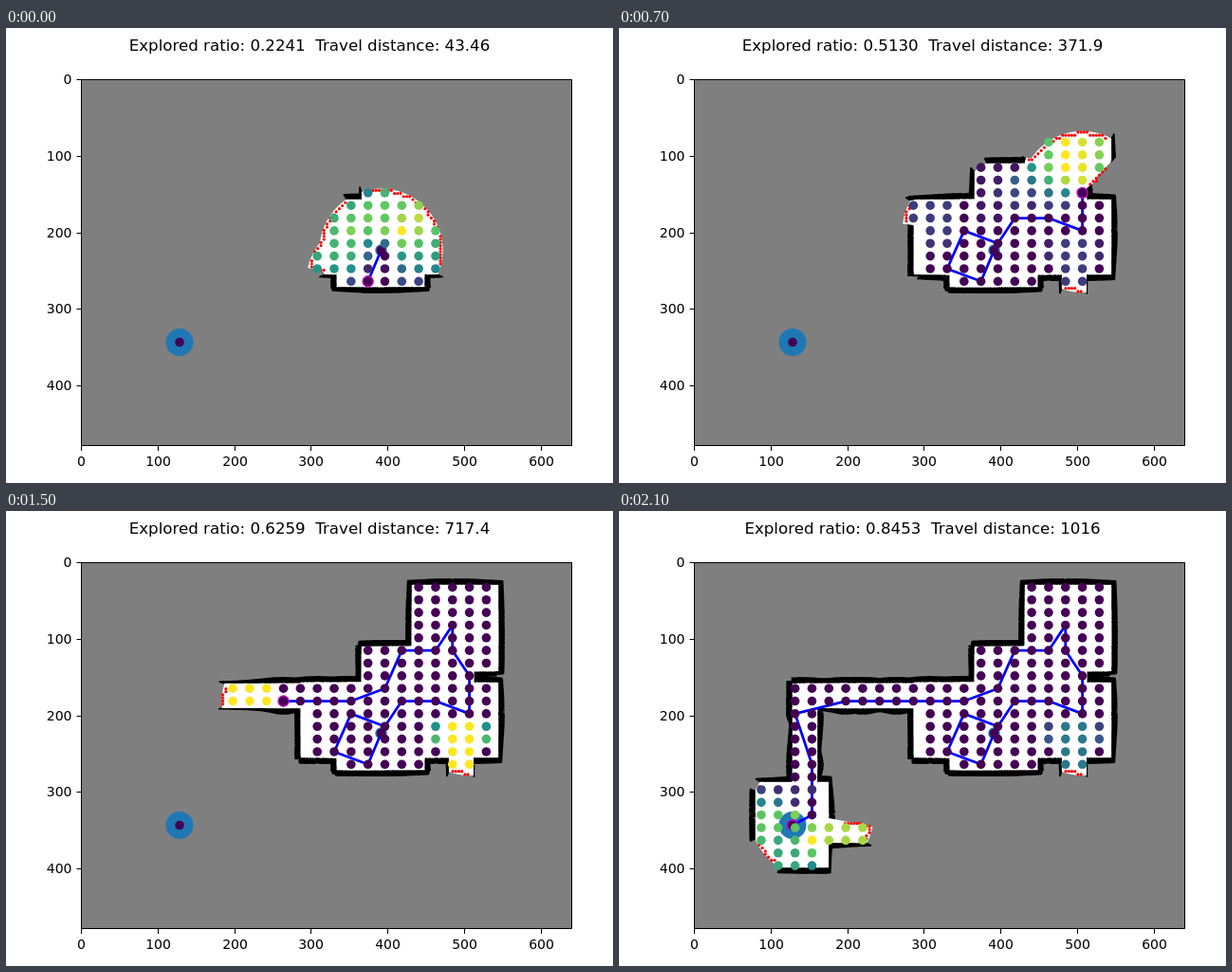
These frames come from a looping animation (640x480 px, 2200 ms). An HTML page with a canvas:

```html
<!DOCTYPE html>
<html>
<head>
<meta charset="utf-8">
<style>
html, body { margin: 0; width: 100%; height: 100%; overflow: hidden; background: #fff; }
canvas { display: block; }
</style>
</head>
<body>
<canvas id="stage" width="640" height="480"></canvas>
<script>
const ctx = document.getElementById('stage').getContext('2d');
const STEP_MS = 100, UNIT = 0.8078, RANGE = 80 * UNIT, GAIN_RANGE = 56;
const WALL_DEPTH = 6.5, RAYS = 1200, CELL = 4 * UNIT;

// Floor plan as overlapping rectangles: left, top, right, bottom
const rooms = [
  [428, 78, 519, 169], [375, 143, 493, 182], [311, 181, 519, 260],
  [349, 259, 441, 273], [467, 259, 493, 330],
  [183, 182, 311, 208], [183, 208, 209, 286],
  [144, 286, 221, 376], [221, 324, 300, 350]
];
const node = (i, j) => ({ x: 150 + 17.82 * i, y: 80.4 + 13.35 * j });
const start = { x: 395.5, y: 234.5 }, goal = { x: 183, y: 331.5 };

// Stops of the robot on the node grid
const stops = [
  [13, 14], [11, 13], [12, 10], [14, 11], [15, 9], [17, 9], [19, 10],
  [19, 7], [18, 5], [18, 3], [17, 5], [15, 5], [14, 8], [12, 9],
  [10, 9], [8, 9], [6, 9], [5, 9], [2, 10], [3, 14], [3, 18]
];
const path = [start, ...stops.map(s => node(...s)), goal];
const distance = (a, b) => Math.hypot(a.x - b.x, a.y - b.y);
const lerp = (a, b, t) => a + (b - a) * t;

// Readings at a few steps; in between they grow with the way travelled
const readings = [
  { step: 0, ratio: 0.2241, travel: 43.46 }, { step: 3, ratio: 0.2861, travel: 192.1 },
  { step: 6, ratio: 0.4625, travel: 322.6 }, { step: 9, ratio: 0.5871, travel: 444.2 },
  { step: 13, ratio: 0.5892, travel: 628.8 }, { step: 17, ratio: 0.6535, travel: 783.8 },
  { step: 21, ratio: 0.8453, travel: 1016 }
];

function wayLength(from, to) {
  let sum = 0;
  for (let k = from + 1; k <= to; k++) sum += distance(path[k], path[k + 1]);
  return sum;
}

function title(step) {
  const k = Math.max(1, readings.findIndex(r => r.step >= step));
  const a = readings[k - 1], b = readings[k];
  const t = wayLength(a.step, step) / wayLength(a.step, b.step);
  const ratio = lerp(a.ratio, b.ratio, t).toFixed(4);
  return `Explored ratio: ${ratio}  Travel distance: ${lerp(a.travel, b.travel, t).toPrecision(4)}`;
}

const viridis = ['440154', '3b528b', '21918c', '5ec962', 'fde725']
  .map(h => [0, 2, 4].map(k => parseInt(h.slice(k, k + 2), 16)));

function heat(v) {
  const p = v * 4, k = Math.min(3, Math.floor(p));
  return `rgb(${viridis[k].map((c, n) => Math.round(lerp(c, viridis[k + 1][n], p - k)))})`;
}

const isFloor = (x, y) => rooms.some(([l, t, r, b]) => x >= l && x <= r && y >= t && y <= b);
const isOpen = ({ x, y }) => [-3, 3].every(d => isFloor(x + d, y) && isFloor(x, y + d));

function sees(a, b, range) {
  const d = distance(a, b);
  if (d > range) return false;
  const n = Math.ceil(d / 1.5);
  for (let k = 1; k < n; k++) {
    if (!isFloor(lerp(a.x, b.x, k / n), lerp(a.y, b.y, k / n))) return false;
  }
  return true;
}

// One sweep of the range sensor; each ray that hits a wall also marks some depth behind it
function scan(from) {
  const area = new Path2D(), walls = new Path2D();
  for (let k = 0; k < RAYS; k++) {
    const a = k / RAYS * 2 * Math.PI, c = Math.cos(a), s = Math.sin(a);
    let r = 0;
    while (r < RANGE && isFloor(from.x + c * r, from.y + s * r)) r += 0.5;
    area.lineTo(from.x + c * r, from.y + s * r);
    if (r >= RANGE) continue;
    walls.moveTo(from.x + c * (r - 1), from.y + s * (r - 1));
    walls.lineTo(from.x + c * (r + WALL_DEPTH), from.y + s * (r + WALL_DEPTH));
  }
  area.closePath();
  return { area, walls };
}

const cells = new Map(), nodes = [];
for (let i = 0; i < 140; i++) {
  for (let j = 0; j < 110; j++) {
    const p = { i, j, x: 80 + i * CELL, y: 55 + j * CELL, seen: false };
    if (isFloor(p.x, p.y)) cells.set(i * 200 + j, p);
  }
}
for (let i = 0; i <= 20; i++) {
  for (let j = 0; j <= 22; j++) {
    const p = node(i, j);
    if (isFloor(p.x, p.y)) nodes.push({ ...p, seen: false });
  }
}

const scans = [];
function explore(from) {
  scans.push(scan(from));
  for (const p of [...cells.values(), ...nodes]) p.seen = p.seen || sees(from, p, RANGE - 0.3);
}

// The frontier is open floor next to unseen floor; a node's gain is how much of it is in view
function survey(step) {
  if (step < stops.length) explore(path[step + 1]);
  const hidden = (i, j) => { const c = cells.get(i * 200 + j); return c && !c.seen; };
  const frontier = [...cells.values()].filter(c => c.seen && isOpen(c) &&
    (hidden(c.i - 1, c.j) || hidden(c.i + 1, c.j) || hidden(c.i, c.j - 1) || hidden(c.i, c.j + 1)));
  const visited = path.slice(0, step + 2);
  const dots = nodes.filter(n => n.seen).map(n => ({
    x: n.x, y: n.y,
    gain: visited.some(v => distance(v, n) < 1) ? 0
      : frontier.filter(f => sees(n, f, GAIN_RANGE)).length
  }));
  const most = Math.max(1, ...dots.map(d => d.gain));
  for (const d of dots) d.color = heat(d.gain / most);
  return { frontier, visited, dots, scanCount: scans.length, title: title(step) };
}

explore(start);
const states = path.slice(1).map((_, step) => survey(step));

function disc({ x, y }, r, color) {
  ctx.fillStyle = color;
  ctx.beginPath();
  ctx.arc(x, y, r, 0, 2 * Math.PI);
  ctx.fill();
}

function label(text, x, y, size, align) {
  ctx.font = `${size}px "DejaVu Sans", sans-serif`;
  ctx.textAlign = align;
  ctx.fillText(text, x, y);
}

function drawAxes() {
  ctx.fillStyle = ctx.strokeStyle = '#000';
  ctx.lineWidth = 1;
  ctx.strokeRect(79.5, 54.5, 517, 386);
  ctx.beginPath();
  for (let v = 0; v <= 600; v += 100) {
    const x = Math.round(79 + v * UNIT) + 0.5, y = Math.round(54 + v * UNIT) + 0.5;
    ctx.moveTo(x, 441);
    ctx.lineTo(x, 446);
    label(v, x, 462, 14, 'center');
    if (v > 400) continue;
    ctx.moveTo(79, y);
    ctx.lineTo(74.5, y);
    label(v, 69.5, y + 4.8, 14, 'right');
  }
  ctx.stroke();
}

function draw({ frontier, visited, dots, scanCount, title }) {
  const known = scans.slice(0, scanCount);
  ctx.fillStyle = '#fff';
  ctx.fillRect(0, 0, 640, 480);
  ctx.fillStyle = '#7f7f7f';
  ctx.fillRect(79, 54, 518, 387);

  ctx.strokeStyle = '#000';
  ctx.lineWidth = 1.6;
  for (const { walls } of known) ctx.stroke(walls);
  ctx.fillStyle = '#fff';
  for (const { area } of known) ctx.fill(area);

  for (const f of frontier) disc(f, 1.6, '#f00');
  disc(goal, 14.5, '#1f77b4');
  disc(start, 6.2, '#1f77b4');

  ctx.strokeStyle = '#00f';
  ctx.lineWidth = 2.78;
  ctx.lineJoin = 'round';
  ctx.beginPath();
  for (const { x, y } of visited) ctx.lineTo(x, y);
  ctx.stroke();

  disc(visited[visited.length - 1], 6.2, '#bf00bf');
  for (const p of [start, goal]) disc(p, 4.8, heat(0));
  for (const d of dots) disc(d, 4.8, d.color);

  drawAxes();
  label(title, 320, 24, 16.67, 'center');
}

let shown = -1;
const begin = performance.now();
function tick() {
  const step = Math.floor((performance.now() - begin) / STEP_MS) % states.length;
  if (step !== shown) draw(states[shown = step]);
  requestAnimationFrame(tick);
}
tick();
</script>
</body>
</html>
```
